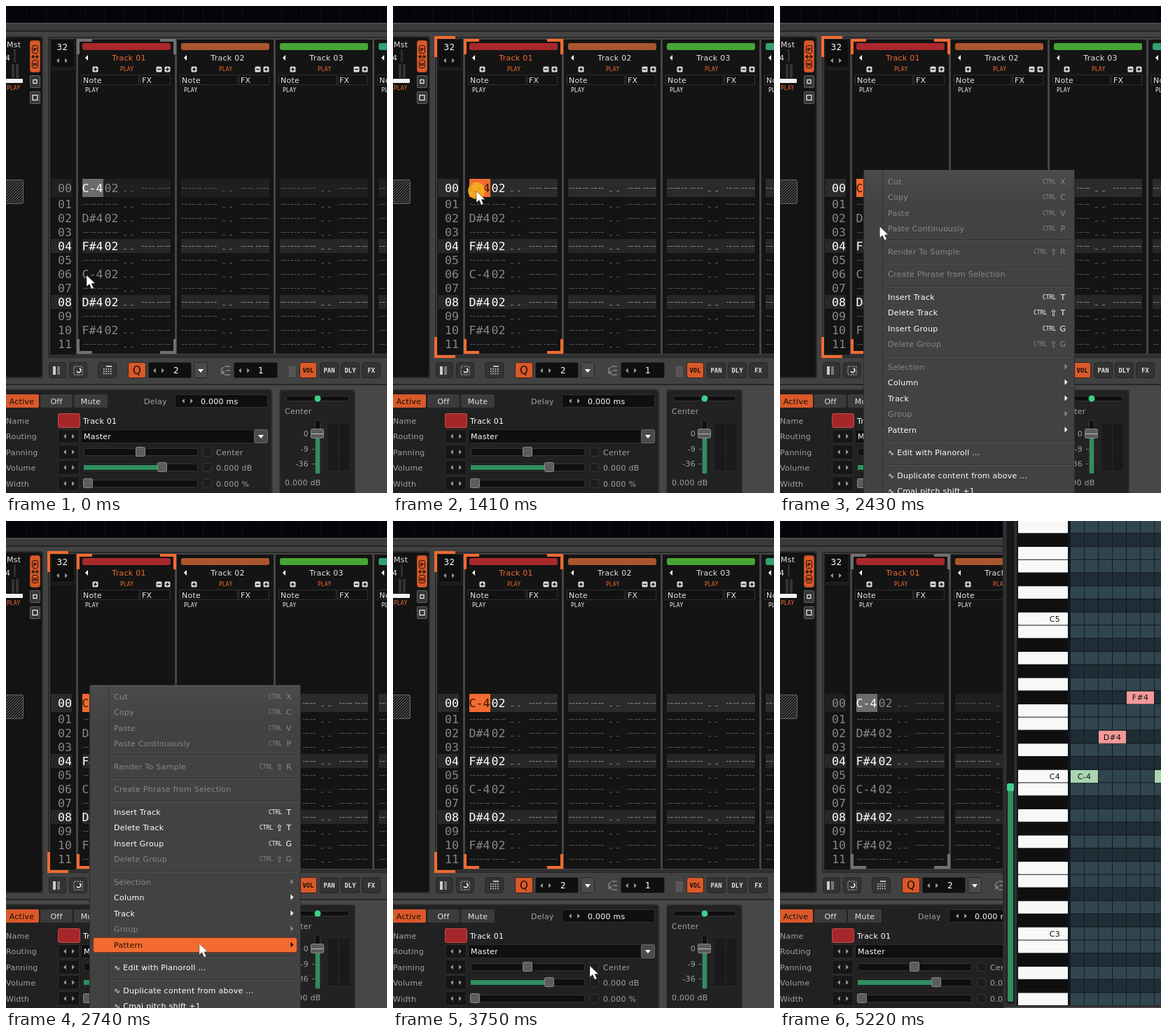
These frames come from a looping animation (544 by 696 pixels, 5300 ms). An HTML page:

```html
<!DOCTYPE html>
<html lang="en">
<head>
<meta charset="utf-8">
<title>Pattern editor</title>
<style>
html, body { margin: 0; width: 100%; height: 100%; overflow: hidden; background: #424242; }
svg { display: block; width: 544px; height: 696px; }
text { font-family: "DejaVu Sans", sans-serif; white-space: pre; letter-spacing: .25px; }
.m { font-family: "DejaVu Sans Mono", monospace; letter-spacing: 0; }
</style>
</head>
<body>
<svg id="stage" viewBox="0 0 544 696" xmlns="http://www.w3.org/2000/svg"></svg>
<script>
const LOOP = 5300;
const ORANGE = '#f26b30', BUTTON = '#d9592a', GREEN = '#2f8f5f', MINT = '#3fd08c';
const BLACK = '#0f0f0f', GREY = '#a2a2a2', LIGHT = '#e4e4e4', INK = '#1b0d06';

const rect = (x, y, w, h, fill, rx = 0, more = '') =>
  `<rect x="${x}" y="${y}" width="${w}" height="${h}" rx="${rx}" fill="${fill}" ${more}/>`;
const box = (x, y, w, h, fill, stroke, rx = 0) =>
  rect(x + .5, y + .5, w - 1, h - 1, fill, rx, `stroke="${stroke}"`);
const path = (d, stroke, width = 1, more = '') =>
  `<path d="${d}" fill="none" stroke="${stroke}" stroke-width="${width}" ${more}/>`;
const shape = (d, fill) => `<path d="${d}" fill="${fill}"/>`;
// y is the middle of the capitals
const text = (x, y, s, fill, size = 11, more = '') =>
  `<text x="${x}" y="${Math.round(y + size * .36)}" font-size="${size}" fill="${fill}" ${more}>${s}</text>`;
const mid = 'text-anchor="middle"', mono = 'class="m"';
const mono8 = (x, y, s, fill) => text(x, y, s, fill, 8, mono);
const note = (x, y, s, fill) => text(x - .5, y, s, fill, 16.6, mono);
const tri = (x, y, dir, fill, r = 4) =>
  shape(`M${x - dir * r / 2} ${y - r}v${2 * r}l${dir * r} ${-r}z`, fill);
const down = (x, y, fill) => shape(`M${x - 4} ${y - 2}h8l-4 5z`, fill);
const arrows = (x, y) => tri(x, y, -1, GREY, 3.5) + tri(x + 12, y, 1, GREY, 3.5);
const range = (n, f) => Array.from({ length: n }, (_, i) => f(i)).join('');

/* ---- pattern editor ---- */
const trackX = [109, 250, 391, 532];
const bars = ['#a9282b', '#a9562e', '#47a535', '#35a070'];
const notes = { 0: 'C-4', 2: 'D#4', 4: 'F#4', 6: 'C-4', 8: 'D#4', 10: 'F#4' };
const rowY = i => i ? 263 + i * 20 : 260;

const dots = (x, y, w, c) => path(`M${x} ${y + .5}h${w}`, c, 1, 'stroke-dasharray="3 1 4 2"');

function cells(x, y, c, filled) {
  return (filled ? '' : dots(x + 1, y, 28, c) + dots(x + 33, y, 18, c)) +
    path(`M${x + 59} ${y + 4.5}h4m6 0h4`, c) +
    dots(x + 85, y, 18, c) + dots(x + 107, y, 19, c);
}

function patternRow(i, lit, band, h) {
  const y = rowY(i), c = lit ? '#fff' : '#878787', d = lit ? '#858585' : '#585858';
  let s = band ? rect(64, y - h / 2, 30, h, band) : '';
  s += note(74.5, y, String(i).padStart(2, '0'), c);
  trackX.forEach((x, k) => {
    const n = k === 0 && notes[i];
    if (band) s += rect(x, y - h / 2, 126, h, band);
    s += cells(x, y, d, n);
    if (n) s += note(x, y, n, c) + note(x + 32, y, '02', c);
  });
  return s;
}

const corner = (x, y, dx, dy, c) => path(`M${x + dx} ${y}H${x}V${y + dy}`, c, 4);

function focus(on) {
  const c = on ? ORANGE : '#707070';
  let s = patternRow(0, on, on ? '#2b2b2b' : '#1f1f1f', 26);
  s += rect(109, 247, 30, 26, on ? ORANGE : '#6c6c6c') + note(109, 260, 'C-4', on ? '#351708' : '#fff');
  s += corner(103, 49, 20, 20, c) + corner(241, 49, -21, 20, c) +
    corner(103, 495, 20, -19, c) + corner(241, 495, -21, -19, c);
  if (on) s += corner(61, 45, 28, 28, c) + corner(61, 501, 28, -28, c);
  return s;
}

const sign = (x, y, plus) => rect(x - 4, y - 4, 8, 8, '#dcdcdc', 1.5) +
  path(`M${x - 2.5} ${y}h5` + (plus ? `M${x} ${y - 2.5}v5` : ''), '#111', 1.4);

function track(x, i) {
  return rect(x - 6, 48, 138, 449, '#141414') +
    rect(x, 53, 126, 10, bars[i], 3) +
    tri(x + 6, 74, -1, '#fff') +
    text(x + 66.5, 74, 'Track 0' + (i + 1), i ? LIGHT : ORANGE, 11, mid) +
    sign(x + 18.5, 90.5, true) + mono8(x + 54, 90.5, 'PLAY', ORANGE) +
    sign(x + 109.5, 90.5) + sign(x + 121.5, 90.5, true) +
    box(x - 2, 98, 83, 15, '#121212', '#303030') + text(x + 1, 106, 'Note', LIGHT) +
    box(x + 82, 98, 44, 15, '#121212', '#303030') + text(x + 85, 106, 'FX', LIGHT) +
    mono8(x + 4, 120.5, 'PLAY', '#f0f0f0');
}

function editor() {
  return rect(60, 44, 490, 459, '#2a2a2a', 3) + rect(62, 46, 490, 455, '#454545', 2) +
    rect(63, 47, 37, 451, '#141414') + rect(64, 88, 35, 4, '#1c1c1c') +
    box(64, 47, 34, 41, BLACK, '#232323', 2) + text(80.5, 59, '32', '#fff', 12, mid) + arrows(74, 78) +
    trackX.map(track).join('') +
    range(11, i => patternRow(i + 1, i === 3 || i === 7, i === 3 || i === 7 ? '#272727' : '', 20)) +
    rect(60, 498, 490, 4, '#303030');
}

/* ---- surroundings ---- */
function leftStrip() {
  const square = (y, r) => box(34, y, 15, 18, '#353535', '#666', 1) +
    rect(41.5 - r, y + 9 - r, 2 * r, 2 * r, 'none', 0, 'stroke="#e8e8e8" stroke-width="1.3"');
  const badge = (y, s) => rect(37.5, y - 5.5, 8, 11, 'none', 2, `stroke="${INK}"`) +
    text(41.5, y, s, INK, 7, mid + ' font-weight="bold"');
  return rect(-5, 43, 58, 489, '#2a2a2a', 4) + rect(-5, 45, 56, 485, '#131313', 4) +
    text(1, 55, 'Mst', LIGHT) + text(-1, 74, '4', LIGHT) +
    rect(11, 62, 3, 18, '#2e2e2e') + rect(8, 83, 4, 20, '#333') + rect(14, 83, 4, 20, '#333') +
    rect(-2, 104, 26, 6, '#f2f2f2', 1) + mono8(1, 117, 'PLAY', ORANGE) +
    box(34, 49, 15, 46, BUTTON, '#b04a24', 3) + badge(62, 'P') + badge(83, 'H') +
    path('M37 72.5h9m-6-2.5l-3 2.5 3 2.5m3-5l3 2.5-3 2.5', INK, 1.2) +
    square(99, 2.5) + square(122, 3.5) +
    rect(-5, 248.5, 29.5, 34, 'url(#hatch)', 2, 'stroke="#666"');
}

function button(x, w, label, on) {
  return box(x, 509, w, 23, on ? BUTTON : '#333', on ? '#3a2016' : '#262626', 3) +
    (label ? text(x + w / 2, 520.5, label, on ? INK : LIGHT, 8.8, `${mono} ${mid} font-weight="bold"`) : '');
}

const spin = (x, w, v, tx) => box(x, 509, w, 23, BLACK, '#2c2c2c', 2) + arrows(x + 9, 521) + text(tx, 521, v, '#fff', 12);

function toolbar() {
  const grid = (x, y, nx, ny, step, c) => range(nx * ny, i =>
    rect(x + i % nx * step, y + Math.floor(i / nx) * step, 1.6, 1.6, c));
  return button(61, 25) + rect(67, 515, 4, 12, '#ccc') + rect(73, 515, 4, 12, '#777') +
    button(90, 26) + rect(97, 515, 12, 12, 'none', 1, 'stroke="#ccc" stroke-dasharray="2 1.5"') +
    path('M105 518a3 3 0 1 1-4 4', '#fff', 1.5) +
    button(131, 27) + grid(139, 518, 4, 3, 3.3, '#d5d5d5') + path('M143 515h8', '#fff', 1.4) +
    button(174, 26, '', true) + text(187, 520.5, 'Q', INK, 15, mid) +
    spin(203, 62, '2', 239) + box(268, 509, 20, 23, '#4a4a4a', '#262626', 2) + down(278, 521, '#fff') +
    path('M320 515h-8m8 6h-6m6 6h-8M311 516q-7 5 0 9m0-4v4h-4', '#8b8b8b', 1.4) +
    spin(325, 63, '1', 360) + grid(404, 515, 4, 6, 2.6, '#777') +
    button(419, 25, 'VOL', true) + button(448, 27, 'PAN') + button(478, 27, 'DLY') + button(508, 27, 'FX');
}

const knob = (x, y, w, h) => box(x, y, w, h, '#5c5c5c', '#8a8a8a', 2);

function slider(y, label, kx, fill, value) {
  return text(0, y, label, GREY) + box(74, y - 11, 31, 21, '#161616', '#2f2f2f', 2) + arrows(84, y - .5) +
    box(111, y - 6, 163, 11, BLACK, '#333', 2) + (fill ? rect(111, y - 4, kx - 111, 7, GREEN) : '') +
    knob(kx, y - 8, 14, 14) + box(281, y - 7, 13, 13, '#1c1c1c', '#373737', 2) + text(300, y, value, GREY);
}

function mixer() {
  const tab = (x, w, s, on) => rect(x, 555, w, 19, on ? BUTTON : '#3b3b3b', 2) +
    text(x + w / 2, 565, s, on ? INK : LIGHT, 11, mid);
  return rect(0, 540, 544, 2, '#262626') + rect(0, 542, 544, 154, '#474747') +
    rect(-6, 548, 386, 160, '#2b2b2b', 5, 'stroke="#333"') + rect(-6, 549, 384, 160, '#212121', 4) +
    tab(-2, 49, 'Active', true) + tab(49, 46, 'Off') + tab(97, 48, 'Mute') +
    text(197, 565, 'Delay', GREY) + box(241, 555, 133, 19, BLACK, '#303030', 2) + arrows(253, 564.5) +
    text(278, 565, '0.000 ms', '#fff') +
    text(0, 593, 'Name', GREY) + box(74, 582, 32, 21, '#a5272a', '#c04a4c', 2) +
    text(110, 593, 'Track 01', '#fff') +
    text(0, 615, 'Routing', GREY) + box(74, 605, 31, 20, '#161616', '#2f2f2f', 2) + arrows(84, 615) +
    box(107, 605, 267, 20, BLACK, '#2c2c2c', 2) + text(111, 615, 'Master', '#fff') +
    box(354, 605, 20, 20, '#4a4a4a', '#666', 2) + down(364, 615, '#fff') +
    slider(638, 'Panning', 185, false, 'Center') +
    slider(660, 'Volume', 216, true, '0.000 dB') +
    slider(683, 'Width', 110, false, '0.000 %') +
    rect(390, 548, 109, 160, '#333', 4) + rect(391.5, 549.5, 106, 160, '#222', 4) +
    box(400, 557, 90, 8, BLACK, '#363636', 2) + `<circle cx="445" cy="561" r="4.5" fill="${MINT}"/>` +
    text(398, 579, 'Center', GREY) +
    [['0', 611], ['-9', 633], ['-36', 654]].map(([s, y]) =>
      text(432, y, s, GREY, 11, 'text-anchor="end"') + rect(437, y, 4, 1, '#777')).join('') +
    box(441, 592, 8, 77, BLACK, '#363636', 2) + rect(442, 612, 6, 56, GREEN) + knob(435, 604, 19, 14) +
    path('M436 611.5h17', '#bbb') +
    range(22, i => rect(460, 598 + i * 3, 14, 1.6, '#131313') + rect(476, 598 + i * 3, 14, 1.6, '#131313')) +
    text(398, 681, '0.000 dB', GREY);
}

function topBar() {
  return rect(0, 0, 544, 25, '#04050a') + range(20, i => rect(i * 28 + 1, 0, 1, 24, '#0e0f18')) +
    rect(0, 24, 544, 2, '#4d4d4d') + rect(0, 26, 544, 9, '#393939') + rect(0, 35, 544, 2, '#262626');
}

/* ---- context menu: label, y, shortcut key, shift, kind ---- */
const items = [
  ['Cut', 251, 'X', 0, 'off'], ['Copy', 273, 'C', 0, 'off'], ['Paste', 296, 'V', 0, 'off'],
  ['Paste Continuously', 318, 'P', 0, 'off'], ['Render To Sample', 351, 'R', 1, 'off'],
  ['Create Phrase from Selection', 383, '', 0, 'off'], ['Insert Track', 416, 'T'],
  ['Delete Track', 438, 'T', 1], ['Insert Group', 461, 'G'], ['Delete Group', 483, 'G', 1, 'off'],
  ['Selection', 516, '>', 0, 'off'], ['Column', 538, '>'], ['Track', 561, '>'],
  ['Group', 583, '>', 0, 'off'], ['Pattern', 606, '>'], ['∿ Edit with Pianoroll ...', 638],
  ['∿ Duplicate content from above ...', 671], ['∿ Cmaj pitch shift +1', 693]
];
const itemFill = it => it[4] ? '#888' : '#fff';

function menuItem(it) {
  const [s, y, key, shift] = it, c = 'inherit';
  let out = text(154, y, s, c);
  if (key === '>') out += tri(408.5, y - .5, 1, c);
  else if (key) {
    out += text(404, y, key, c, 11, mid) + mono8(shift ? 362 : 375, y, 'CTRL', c);
    if (shift) out += text(390.5, y, '⇧', c, 13, mid);
  }
  return `<g class="item" fill="${itemFill(it)}">${out}</g>`;
}

function menu() {
  return rect(119.5, 234.5, 301, 470, 'url(#menuBg)', 2, 'stroke="#2c2c2c"') + rect(120, 235, 300, 1, '#5c5c5c') +
    rect(146, 236, 1, 460, '#333') +
    [334, 367, 400, 500, 622, 655].map(y => rect(151, y, 265, 1, '#303030') + rect(151, y + 1, 265, 1, '#555')).join('') +
    rect(124.5, 0, 291, 21, ORANGE, 3, 'id="hover" stroke="#7d3518"') + items.map(menuItem).join('');
}

/* ---- piano roll ---- */
function pianoRoll() {
  const H = 18.75, keyY = k => 365 - H * k;
  const bar = (col, k, s, c) => rect(415 + col * 20, keyY(k) - 9, 39, 18, c) +
    (s ? text(434.5 + col * 20, keyY(k), s, '#111', 11, mid) : '');
  const key = i => {
    const k = i - 17, n = (k + 24) % 12, y = keyY(k) - H / 2, dark = [1, 3, 6, 8, 10].includes(n);
    return rect(340, y, 71, H - 1, dark ? BLACK : '#f8f8f8', 1) +
      rect(415, y, 130, H - 1, dark ? '#1f2d36' : '#31454e') +
      (n ? '' : text(400, y + H / 2, 'C' + (4 + k / 12), '#111', 11, 'text-anchor="end"'));
  };
  return rect(318, 0, 226, 696, '#454545') + rect(318, 0, 2, 696, '#2a2a2a') + rect(320, 0, 18, 692, '#303030') +
    rect(338, 0, 206, 692, '#12171b') + box(323, -4, 12, 694, '#171717', '#222', 3) +
    rect(325, 380, 8, 307, GREEN, 2) + rect(324, 375, 10, 11, MINT, 2) +
    range(37, key) + range(7, i => rect(414 + i * 20, 0, 1, 692, '#141b20')) +
    bar(0, 0, 'C-4', '#a9d6b1') + bar(2, 3, 'D#4', '#f49a98') + bar(4, 6, 'F#4', '#f49a98') + bar(6, 0, '', '#a9d6b1') +
    rect(318, 692, 226, 2, '#2a2a2a');
}

const stage = document.getElementById('stage');
const group = (id, s) => `<g id="${id}">${s}</g>`;
stage.innerHTML = `<defs>
  <linearGradient id="menuBg" x2="0" y2="1"><stop stop-color="#4b4b4b"/><stop offset=".12" stop-color="#424242"/></linearGradient>
  <pattern id="hatch" width="4" height="4" patternUnits="userSpaceOnUse"><rect width="4" height="4" fill="#1b1b1b"/><path d="M-1 1L1-1M0 4L4 0M3 5L5 3" stroke="#777" stroke-width=".9"/></pattern>
  </defs>` + rect(0, 0, 544, 696, '#424242') + topBar() + leftStrip() + editor() +
  group('idle', focus(false)) + group('active', focus(true)) + toolbar() + mixer() +
  group('menu', menu()) + group('roll', pianoRoll()) +
  `<circle id="click" r="12" fill="#f8ba1c" fill-opacity=".8"/>` +
  group('cursor', '<path d="M0 .6V17L4 13.5 7 20.3 10 19 7.2 12.6H12.3Z" fill="#fff" stroke="#222" stroke-width=".5"/>');

const el = {};
for (const id of ['idle', 'active', 'menu', 'roll', 'click', 'cursor', 'hover']) el[id] = document.getElementById(id);
const itemEls = [...stage.querySelectorAll('.item')];

/* ---- motion ---- */
// the pointer is sampled n times between two moments
const stepped = (t, from, to, n) => t < from ? 0 :
  Math.min(1, (1 + Math.floor((t - from + 4) / ((to - from) / (n - 1)))) / n);
const smooth = u => u * u * (3 - 2 * u);
const smoother = u => u * u * u * (u * (6 * u - 15) + 10);
const mix = (a, b, u) => [a[0] + (b[0] - a[0]) * u, a[1] + (b[1] - a[1]) * u];
const START = [115, 384], CELL = [119, 264], NEAR = [285, 623], EDIT = [281, 635], EXIT = [570, 702];

function pointer(t) {
  if (t < 2430) {
    const u = smooth(stepped(t, 150, 630, 7)), bend = [101, 330];
    return mix(mix(START, bend, u), mix(bend, CELL, u), u);
  }
  if (t < 3050) return mix(CELL, NEAR, smoother(stepped(t, 2430, 2900, 7) ** .65));
  if (t < 4910) return mix(NEAR, EDIT, stepped(t, 3050, 3210, 3));
  return mix(EDIT, EXIT, stepped(t, 4910, 5220, 5) ** 1.5);
}

const show = (node, on) => node.setAttribute('display', on ? 'inline' : 'none');
const within = (t, a, b) => t >= a && t < b;

function draw(t) {
  const [x, y] = pointer(t), on = within(t, 790, 3980), open = within(t, 1490, 3750);
  show(el.active, on);
  show(el.idle, !on);
  show(el.menu, open);
  show(el.roll, t >= 3980);
  show(el.cursor, t < 5220);
  el.cursor.setAttribute('transform', `translate(${x} ${y})`);
  show(el.click, within(t, 710, 950) || within(t, 1410, 1490) || within(t, 3600, 3750));
  el.click.setAttribute('cx', x);
  el.click.setAttribute('cy', y);
  const hit = items.findIndex(it => !it[4] && Math.abs(y - it[1]) < 11.2);
  show(el.hover, hit >= 0);
  if (hit >= 0) el.hover.setAttribute('y', items[hit][1] - 10.5);
  itemEls.forEach((g, i) => g.setAttribute('fill', i === hit ? INK : itemFill(items[i])));
}

const begin = performance.now();
function tick() {
  draw((performance.now() - begin) % LOOP);
  requestAnimationFrame(tick);
}
tick();
</script>
</body>
</html>
```
